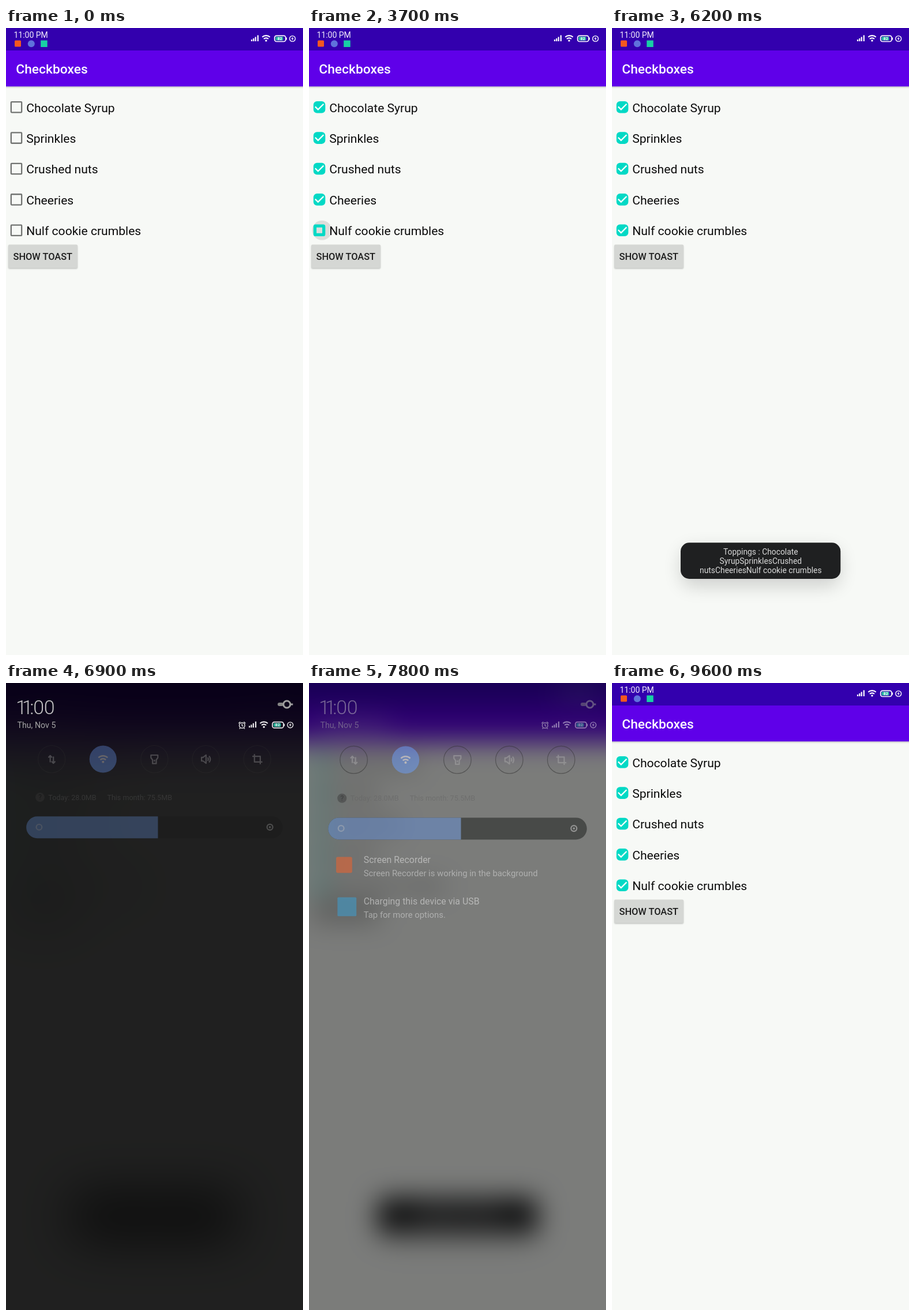
These frames come from a looping animation (515 by 1087 pixels, 9.7 s). An HTML page:

```html
<!DOCTYPE html>
<html lang="en">
<head>
<meta charset="utf-8">
<title>Checkboxes</title>
<style>
  html, body { margin: 0; width: 100%; height: 100%; overflow: hidden; background: #000; }
  svg { display: block; width: 100%; height: 100%; }
  text { font-family: Roboto, sans-serif; }
  .item { font-size: 21.1px; fill: #0b0b0b; }
  .toast-text { font-size: 13.85px; fill: #dadada; text-anchor: middle; }
  .usage { font-size: 13.7px; fill: #636363; }
  .heading { font-size: 17.2px; fill: #f2f2f2; }
  .detail { font-size: 16.1px; fill: #e4e4e4; }
  .line { fill: none; stroke: #a9a9a9; stroke-width: 2.4; stroke-linejoin: round; }
</style>
</head>
<body>
<svg viewBox="0 0 515 1087" preserveAspectRatio="none">
  <defs>
    <linearGradient id="barShade" x2="0" y2="1">
      <stop stop-opacity=".2"/><stop offset="1" stop-opacity="0"/>
    </linearGradient>
    <filter id="soft" x="-30%" y="-120%" width="160%" height="340%"><feGaussianBlur stdDeviation="16"/></filter>
    <filter id="tight" x="-10%" y="-20%" width="120%" height="150%"><feGaussianBlur stdDeviation="1.2"/></filter>
    <clipPath id="buttonClip"><rect x="4" y="375.5" width="120" height="40.5" rx="2"/></clipPath>
    <g id="wifi" fill="none" stroke="#fff" stroke-width="2.1">
      <path d="M-6.7 -2.2A9.6 9.6 0 0 1 6.7 -2.2M-4 1A5.7 5.7 0 0 1 4 1"/>
      <circle cy="3.9" r="1.7" fill="#fff" stroke="none"/>
    </g>
    <g id="statusIcons">
      <path d="M426 20v3M429.3 18v5M432.7 15.5v7.5M436.8 12.5v10.5" stroke="#fff" stroke-width="2.2"/>
      <use href="#wifi" x="451" y="18"/>
      <rect x="465.7" y="13.3" width="19.3" height="10.2" rx="3.4" fill="none" stroke="#fff" stroke-width="1.7"/>
      <path d="M486.3 16.5v4" stroke="#fff" stroke-width="1.5"/>
      <rect x="467.6" y="15.2" width="12.8" height="6.4" rx="1.3" fill="#25bfa0"/>
      <text x="474.7" y="21" font-size="7" font-weight="700" fill="#fff" text-anchor="middle">82</text>
      <circle cx="496.7" cy="18.5" r="4.9" fill="none" stroke="#fff" stroke-width="1.4"/>
      <path d="M497.6 14.8l-3 4.2h1.9l-.8 3.2 3.2-4.4h-2z" fill="#fff"/>
    </g>
  </defs>

  <g id="app">
    <rect x="-200" y="-200" width="915" height="1487" fill="#f7f9f6"/>
    <rect x="-200" y="101" width="915" height="4" fill="url(#barShade)"/>
    <rect x="-200" y="-200" width="915" height="301.3" fill="#5f00e9"/>
    <rect x="-200" y="-200" width="915" height="239" fill="#3300ae"/>
    <g id="clock">
      <text x="13.4" y="17.4" font-size="14" fill="#f1edfb">11:00 PM</text>
      <rect x="15" y="21.5" width="11" height="11" rx="1.5" fill="#f4581f"/>
      <circle cx="43.8" cy="27.3" r="6" fill="#5f72dc"/>
      <rect x="60.2" y="21.5" width="11.5" height="11.5" fill="#18cfa5"/>
    </g>
    <use href="#statusIcons"/>
    <text x="17.3" y="79.3" font-size="22.8" font-weight="500" fill="#fff">Checkboxes</text>
    <g id="list"></g>
    <rect id="buttonShadow" x="4" y="377" width="120" height="40.5" rx="2" filter="url(#tight)"/>
    <rect x="4" y="375.5" width="120" height="40.5" rx="2" fill="#d5d7d4"/>
    <circle id="buttonRipple" cx="64" cy="396" clip-path="url(#buttonClip)"/>
    <text x="12.5" y="401.7" font-size="16.4" font-weight="500" fill="#1d1d1d">SHOW TOAST</text>
    <g id="toast">
      <rect x="121" y="904" width="273" height="63" rx="16" opacity=".17" filter="url(#soft)"/>
      <rect x="119" y="892.3" width="277.3" height="62.7" rx="15" fill="#1f2021"/>
      <text class="toast-text" x="257.8" y="913">Toppings : Chocolate</text>
      <text class="toast-text" x="257.8" y="929.2">SyrupSprinklesCrushed</text>
      <text class="toast-text" x="257.8" y="945.3">nutsCheeriesNulf cookie crumbles</text>
    </g>
  </g>

  <rect id="dim" width="515" height="1087"/>

  <g id="header">
    <text x="17 27.7 41.3 47.3 65.8" y="53.8" font-size="34" font-weight="300" fill="#c4c4c4">11:00</text>
    <text x="19.5" y="77.8" font-size="14.2" fill="#a5a5a5">Thu, Nov 5</text>
    <path d="M474 37h4" stroke="#858585" stroke-width="6" stroke-linecap="round"/>
    <path d="M493 37h4.5" stroke="#a0a0a0" stroke-width="3"/>
    <circle cx="487" cy="37" r="6" fill="none" stroke="#a0a0a0" stroke-width="3"/>
    <g fill="none" stroke="#ddd" stroke-width="1.5">
      <circle cx="409.3" cy="73.5" r="4.8"/>
      <path d="M409.3 70.5v3.3l2 1.2M403.3 70l3-2.7M415.3 70l-3-2.7M406 78l-1.3 1.5M412.6 78l1.3 1.5"/>
    </g>
    <use href="#statusIcons" x="-3.8" y="54.3" opacity=".9"/>
  </g>

  <g id="panel">
    <g id="toggles"></g>
    <path class="line" d="M60.3 150v-12M56.8 141l3.5-3.8 3.5 3.8M66.3 139v12M62.8 148l3.5 3.8 3.5-3.8" stroke-width="2"/>
    <use href="#wifi" transform="translate(160.2 144) scale(1.3)"/>
    <path class="line" d="M250.8 136.3h13v5l-3 4v7h-7v-7l-3-4zM257.3 145v3.5"/>
    <path class="line" d="M346.5 140.5h3l5.5-4.3v15.6l-5.5-4.3h-3zM358 140.8q2.5 3.2 0 6.4M360.8 138q4.5 6 0 12" stroke-width="2"/>
    <path class="line" d="M446.5 134.5v14.8h15M442.5 138.7h15v14.8"/>
    <circle cx="41" cy="216" r="8.7" fill="#3c3c3c"/>
    <text x="41" y="220.6" font-size="13" fill="#0c0c0c" text-anchor="middle">?</text>
    <text class="usage" x="56.7" y="221">Today: 28.0MB</text>
    <text class="usage" x="168" y="221">This month: 75.5MB</text>
    <rect x="15" y="252.3" width="485" height="41.2" rx="20.6" fill="#171918"/>
    <path d="M264 252.3H35.6a20.6 20.6 0 0 0 0 41.2H264z" fill="#618bd3"/>
    <circle class="line" cx="39.3" cy="272.5" r="5.3" style="stroke:#a9bfe7"/>
    <circle class="line" cx="475.7" cy="272.5" r="5.4"/>
    <circle cx="475.7" cy="272.5" r="2" fill="#a9a9a9"/>
  </g>

  <g id="notices">
    <rect x="30" y="326" width="30" height="30" rx="3" fill="#fb6126"/>
    <text class="heading" x="81.5" y="336.8">Screen Recorder</text>
    <text class="detail" x="81.5" y="362">Screen Recorder is working in the background</text>
    <rect x="32.5" y="401.5" width="35.5" height="35.5" rx="2" fill="#39a4dc"/>
    <text class="heading" x="81.5" y="414.8">Charging this device via USB</text>
    <text class="detail" x="81.5" y="440">Tap for more options.</text>
  </g>
</svg>

<script>
const LOOP = 9700, STEP = 100;
const $ = id => document.getElementById(id);
const set = (el, attrs) => { for (const k in attrs) el.setAttribute(k, attrs[k]); };

// Piecewise linear value through [time, value] points.
function track(t, ...points) {
  if (t <= points[0][0]) return points[0][1];
  for (let i = 1; i < points.length; i++) {
    const [t0, v0] = points[i - 1], [t1, v1] = points[i];
    if (t < t1) return v0 + (v1 - v0) * (t - t0) / (t1 - t0);
  }
  return points[points.length - 1][1];
}

const labels = ['Chocolate Syrup', 'Sprinkles', 'Crushed nuts', 'Cheeries', 'Nulf cookie crumbles'];
$('list').innerHTML = labels.map((label, i) => `
  <g transform="translate(18 ${137.2 + i * 53.4})">
    <circle class="ripple"/>
    <rect class="box" fill="none"/>
    <path class="tick" d="M-7.3 -.8L-2.3 4.2L7.3 -5.4" fill="none" stroke="#fff" stroke-width="2.3" pathLength="1" stroke-dasharray="1 2"/>
    <text class="item" x="17.2" y="8.4">${label}</text>
  </g>`).join('');
const rows = [...$('list').children].map((g, i) => ({
  ripple: g.querySelector('.ripple'), box: g.querySelector('.box'),
  tick: g.querySelector('.tick'), pressed: 1500 + i * 500
}));

$('toggles').innerHTML = [0, 1, 2, 3, 4].map(i => `<circle cx="${63 + i * 97.2}" cy="144" r="25.7"
  fill="${i === 1 ? '#6c9ffb' : 'none'}" stroke="${i === 1 ? 'none' : '#303030'}" stroke-width="1.3"/>`).join('');

function drawRow({ ripple, box, tick }, age) {
  set(ripple, {
    cx: track(age, [0, 9], [200, 4.5], [300, 0]),
    r: track(age, [0, 0], [100, 11], [200, 17], [300, 21]),
    opacity: track(age, [0, 0], [100, .1], [200, .11], [300, .07], [400, 0])
  });
  const outer = 10.3, inner = track(age, [100, 8], [200, 5], [300, 0]);
  const side = outer + inner;
  set(box, {
    x: -side / 2, y: -side / 2, width: side, height: side, rx: 1,
    'stroke-width': outer - inner, stroke: age > 100 ? '#02d9c5' : '#727472'
  });
  const drawn = track(age, [200, 0], [400, 1]);
  set(tick, { 'stroke-dashoffset': 1 - drawn, opacity: drawn > 0 ? 1 : 0 });
}

function draw(t) {
  rows.forEach(row => drawRow(row, t - row.pressed));

  set($('buttonRipple'), {
    r: track(t, [4700, 0], [5000, 66]),
    opacity: track(t, [4700, .12], [4950, .12], [5200, 0])
  });
  set($('buttonShadow'), { opacity: track(t, [4700, .22], [4900, .4], [5200, .22]) });
  set($('toast'), { opacity: track(t, [4900, 0], [5200, 1], [8600, 1], [8900, 0]) });

  const closing = track(t, [7700, 1], [7900, 0]);
  const dim = closing * track(t, [6600, 0], [6900, .87], [7000, .95], [7100, 1]);
  const blur = closing * track(t, [6600, 0], [6900, 46]);
  $('app').style.filter = blur > 0 ? `blur(${blur}px)` : 'none';
  set($('dim'), { opacity: dim });
  set($('clock'), { opacity: t < 6700 ? 1 : track(t, [8000, 0], [8300, 1]) });
  set($('header'), { opacity: closing * track(t, [6600, 0], [6900, 1]) });

  const scale = Math.min(track(t, [6700, .85], [6900, .917], [7000, .96], [7200, 1]), .85 + .15 * closing);
  const zoom = `translate(257.5 0) scale(${scale}) translate(-257.5 0)`;
  set($('panel'), { transform: zoom, opacity: closing * track(t, [6750, 0], [6900, .33], [7200, 1]) });
  set($('notices'), { transform: zoom, opacity: closing * track(t, [6900, 0], [7200, 1]) });
}

const start = performance.now();
let shown = -1;
function tick(now) {
  const t = Math.floor(Math.max(0, now - start) % LOOP / STEP) * STEP;
  if (t !== shown) draw(shown = t);
  requestAnimationFrame(tick);
}
draw(0);
requestAnimationFrame(tick);
</script>
</body>
</html>
```
